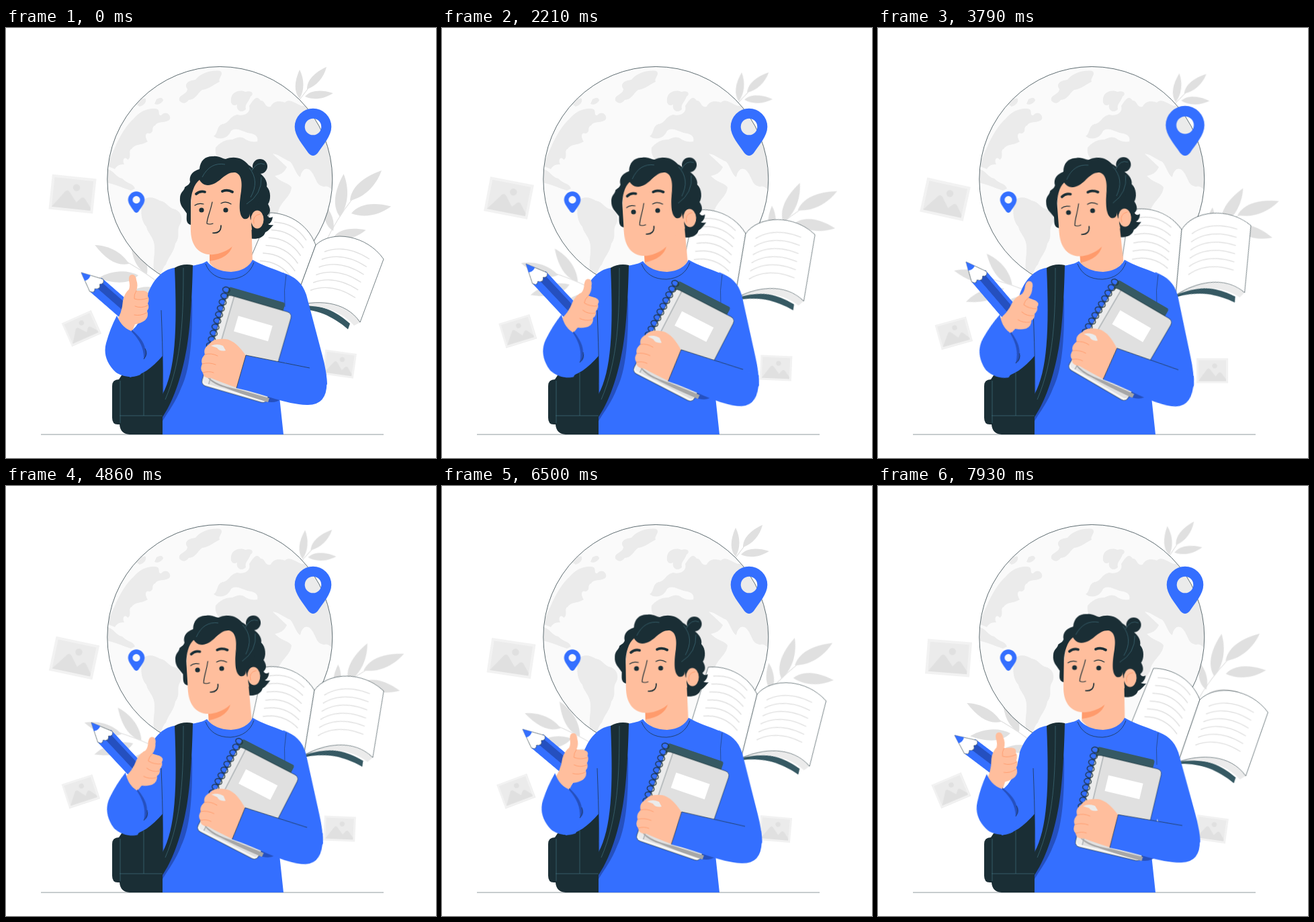
Write an HTML page without scripts that moves like this. It is 640 px wide and 640 px high and loops after 8 s.

```html
<!DOCTYPE html>
<html lang="en">
<head>
<meta charset="utf-8">
<title>Student with globe</title>
<style>
html, body { margin: 0; width: 100%; height: 100%; overflow: hidden; background: #fff; }
svg { display: block; width: 100%; height: 100%; }
.blue { fill: #346fff; }
.navy { fill: #2550bf; }
.dark { fill: #1a2e35; }
.teal { fill: #365963; }
.skin { fill: #ffbe9d; }
.land { fill: #ebebeb; }
.leaf { fill: #e0e0e0; }
.ink { fill: none; stroke: #1a2e35; stroke-width: .7; }
.page { fill: #fff; stroke: #1a2e35; stroke-width: .6; }
.seam { fill: none; stroke: #3f6f7c; stroke-width: .7; }
.fold { fill: none; stroke: #ff9b6c; stroke-width: .9; stroke-linecap: round; }
.rule { fill: none; stroke: #e0e0e0; stroke-width: 1.4; }
.stem { fill: none; stroke: #e0e0e0; stroke-width: 1.2; }

/* body: one long sine swing, --r is the widest angle */
.sway { animation: sway 8s infinite; }
@keyframes sway {
  0% { transform: rotate(0deg); animation-timing-function: cubic-bezier(.33,.37,.67,1); }
  44.2% { transform: rotate(var(--r)); animation-timing-function: cubic-bezier(.33,0,.67,.84); }
  100% { transform: rotate(calc(var(--r) * -.21)); }
}
.head { --r: -4.4deg; transform-origin: 335px 371px; }
.hand { --r: 21deg; transform-origin: 180px 478px; }
.sleeve { --r: 14deg; transform-origin: 180px 495px; }
.note { --r: 14.2deg; transform-origin: 387px 484px; }
.cuff { --r: 8.2deg; transform-origin: 430px 473px; }
.upper { --r: 3deg; transform-origin: 425px 380px; }

/* scenery: floats through six poses */
.drift { animation: drift 8s linear infinite; }
@keyframes drift {
  0% { transform: translate(0px,0px) rotate(0deg); }
  15.1% { transform: var(--a); }
  27.6% { transform: var(--b); animation-timing-function: cubic-bezier(.33,.45,.67,.9); }
  47.4% { transform: var(--c); animation-timing-function: cubic-bezier(.33,.1,.67,.55); }
  60.75% { transform: var(--d); }
  81.25% { transform: var(--e); }
  99.1%, 100% { transform: var(--f); }
}
.sprig { transform-origin: 400px 155px;
  --a: rotate(3.2deg); --b: rotate(5.7deg); --c: rotate(7.3deg);
  --d: rotate(5.1deg); --e: rotate(0deg); --f: rotate(-3.9deg); }
.branch { transform-origin: 475px 320px;
  --a: rotate(9.8deg); --b: rotate(17.8deg); --c: rotate(25deg);
  --d: rotate(21.2deg); --e: rotate(13deg); --f: rotate(5deg); }
.fern { transform-origin: 266px 413px;
  --a: rotate(-6.4deg); --b: rotate(-10.9deg); --c: rotate(-15.2deg);
  --d: rotate(-11.8deg); --e: rotate(-6.3deg); --f: rotate(0deg); }
.book { transform-origin: 461px 323px;
  --a: translate(-4px,-10px) rotate(-7.2deg); --b: translate(-9px,-17px) rotate(-10.8deg);
  --c: translate(-9px,-23px) rotate(-15.1deg); --d: translate(-2px,-19px) rotate(-11.1deg);
  --e: translate(8px,-13px) rotate(-6.2deg); --f: translate(18px,-5px) rotate(-1.2deg); }
.pencil { transform-origin: 112px 364px;
  --a: translate(7px,-7px) rotate(3deg); --b: translate(13px,-13px) rotate(6deg);
  --c: translate(19px,-16px) rotate(8.5deg); --d: translate(15px,-12px) rotate(6deg);
  --e: translate(8px,-2px) rotate(-1deg); --f: translate(2px,7px) rotate(-4deg); }
.pic1 { transform-origin: 99px 247px;
  --a: translate(0px,3px) rotate(2.5deg); --b: translate(.5px,6px) rotate(5deg);
  --c: translate(1px,8px) rotate(6.3deg); --d: translate(2.5px,9px) rotate(6deg);
  --e: translate(4px,9.5px) rotate(2.5deg); --f: translate(6px,9px) rotate(-1.5deg); }
.pic2 { transform-origin: 112px 447px;
  --a: translate(.5px,1px) rotate(4deg); --b: translate(.5px,4px) rotate(7deg);
  --c: translate(.5px,7px) rotate(8.5deg); --d: translate(-1px,7.5px) rotate(6deg);
  --e: translate(-2px,7px) rotate(3.5deg); --f: translate(-3.5px,6px) rotate(1deg); }
.pic3 { transform-origin: 496px 500px;
  --a: translate(0px,3px) rotate(-3deg); --b: translate(1px,6px) rotate(-5.5deg);
  --c: translate(1.5px,10px) rotate(-8deg); --d: translate(.5px,10px) rotate(-5.5deg);
  --e: translate(0px,10.5px) rotate(-3deg); --f: translate(0px,10.5px) rotate(0deg); }

.pulse { transform-origin: 457px 190px; animation: pulse 8s ease-in-out infinite; }
@keyframes pulse {
  0%, 43%, 55%, 100% { transform: scale(1); }
  49% { transform: scale(1.065); }
}
</style>
</head>
<body>
<svg viewBox="0 0 640 640">
<defs>
  <path id="leaf" class="leaf" d="M0 0C22 -20 58 -19 100 0C66 17 28 17 0 0Z"/>
  <g id="pic">
    <rect x="-33" y="-26" width="66" height="52" fill="#f2f2f2"/>
    <rect x="-29" y="-22" width="58" height="44" fill="#ebebeb"/>
    <path class="leaf" d="M-29 22L-11 -3Q-8 -6 -5 -3L7 12L13 5Q16 2 19 5L29 18V22Z"/>
    <circle class="leaf" cx="5" cy="-10" r="5.2"/>
  </g>
  <path id="pin" class="blue" fill-rule="evenodd" d="M-7 -4C-15 -16 -27.3 -29 -27.3 -43A27.3 27.3 0 0 1 27.3 -43C27.3 -29 15 -16 7 -4Q0 4 -7 -4ZM-12.3 -43a12.3 12.3 0 1 0 24.6 0a12.3 12.3 0 1 0 -24.6 0Z"/>
  <path id="rr" class="rule" d="M474 333Q506 321 541 344"/>
  <path id="rl" class="rule" d="M399 289Q430 290 447 316"/>
  <g id="row"><use href="#rr"/><use href="#rl"/></g>
  <pattern id="rings" x="-10" y="-11" width="16" height="9.6" patternUnits="userSpaceOnUse">
    <ellipse class="ink" cx="7" cy="4.8" rx="5.4" ry="4.2" style="stroke-width:1.2"/>
  </pattern>
  <clipPath id="ball"><circle cx="318.3" cy="225" r="167"/></clipPath>
</defs>

<g class="drift pic1"><use href="#pic" transform="translate(99 247) rotate(6)"/></g>
<g class="drift pic2"><use href="#pic" transform="translate(112 447) rotate(-24) scale(.72)"/></g>
<g class="drift pic3"><use href="#pic" transform="translate(496 500) rotate(8) scale(.71)"/></g>

<g class="drift sprig">
  <path class="stem" d="M424 124Q438 105 452 87"/>
  <use href="#leaf" transform="translate(448 91) rotate(-48.7) scale(.44)"/>
  <use href="#leaf" transform="translate(437 105) rotate(-90) scale(.43)"/>
  <use href="#leaf" transform="translate(445 102) rotate(-7) scale(.42)"/>
</g>
<g class="drift branch">
  <path class="stem" d="M475 320Q492 284 516 254"/>
  <use href="#leaf" transform="translate(512 257) rotate(-43.7) scale(.65)"/>
  <use href="#leaf" transform="translate(497 281) rotate(-85) scale(.64)"/>
  <use href="#leaf" transform="translate(514 276) rotate(-10) scale(.6)"/>
  <use href="#leaf" transform="translate(487 312) rotate(-13) scale(.5)"/>
  <use href="#leaf" transform="translate(487 302) rotate(-109) scale(.42)"/>
</g>
<g class="drift fern">
  <path class="stem" d="M266 413Q224 372 176 346"/>
  <use href="#leaf" transform="translate(183 351) rotate(209) scale(.58)"/>
  <use href="#leaf" transform="translate(210 366) rotate(246) scale(.6)"/>
  <use href="#leaf" transform="translate(197 368) rotate(176) scale(.6)"/>
  <use href="#leaf" transform="translate(232 391) rotate(180) scale(.45)"/>
</g>

<circle cx="318.3" cy="225" r="167.5" fill="#fafafa"/>
<g class="land" clip-path="url(#ball)">
  <path d="M258 108C256 99 269 100 270 91C264 83 272 78 282 77C290 66 307 62 319 64C325 69 315 75 318 80C306 86 302 91 292 92C284 98 282 107 272 107Q265 116 258 108Z"/>
  <path d="M150 205L162 178C170 160 178 146 190 135C199 124 210 119 222 120C232 121 224 130 231 130C238 121 248 131 243 137C235 142 226 138 222 145C215 148 222 154 214 157C206 154 207 164 211 169C202 175 192 172 187 180C181 182 188 193 181 196C177 190 172 196 176 203Q166 202 162 210Z"/>
  <path d="M193 113q7 -10 15 -8q2 8 -9 12zM224 106q9 -5 10 2q-6 8 -13 5z"/>
  <path d="M150 210C160 211 163 222 173 224C180 232 190 231 192 239L186 242C174 238 163 233 150 230Z"/>
  <path d="M203 258C210 249 221 252 229 257C240 259 241 268 252 270C263 275 263 287 258 294C254 302 260 310 252 321C250 334 242 340 238 352C232 357 233 367 225 369C215 360 222 341 221 326C221 312 211 306 209 296C199 284 201 270 203 258Z"/>
  <path d="M335 106C335 96 347 91 356 95C366 92 370 98 364 102C361 111 355 113 357 121C350 128 342 122 344 114C337 117 334 112 335 106Z"/>
  <path d="M309 161C316 157 313 146 322 143C332 142 333 131 344 129C354 132 365 126 362 116C368 107 373 99 379 108C386 107 385 120 394 117C399 107 410 109 415 111C421 104 430 112 440 116L500 110V250C485 242 480 233 474 236C460 235 463 222 452 211C446 207 440 211 438 222C431 218 430 207 423 199C413 195 406 188 397 187C404 194 413 202 418 207C414 216 407 219 400 220C409 230 420 230 425 237C424 252 407 259 405 275L390 300H340V205C325 205 309 193 312 178Q323 165 337 166Q348 160 354 164Q363 171 374 169C377 159 366 157 360 156C350 153 342 147 335 153C331 164 318 168 309 161Z"/>
</g>
<circle class="ink" cx="318.3" cy="225" r="167.5"/>

<path class="ink" d="M52 605H562" stroke-opacity=".7"/>

<g class="drift book">
  <path class="teal" d="M427 414C462 407 492 421 512 440L509 448.500C485 427 458 417 427 418Z"/>
  <path fill="#ebebeb" d="M427 415C465 404 505 408 527 438L518 443C497 418 460 410 427 415Z"/>
  <path class="page" d="M461 323C448 288 415 275 393 275L353 368C385 370 415 380 427 415Z"/>
  <path class="page" d="M461 323C485 300 537 308 562 344L527 438C505 405 460 404 427 415Z"/>
  <use href="#row"/>
  <use href="#row" x="-4.2" y="11.5"/>
  <use href="#row" x="-8.4" y="23"/>
  <use href="#row" x="-12.6" y="34.5"/>
  <use href="#row" x="-16.8" y="46"/>
  <use href="#row" x="-21" y="57.5"/>
</g>

<g class="pulse"><use href="#pin" transform="translate(457 190)"/></g>
<use href="#pin" transform="translate(194 275) scale(.45)"/>

<g class="sway head">
  <circle class="dark" cx="378" cy="206" r="11"/>
  <path class="dark" d="M352 205L372 213C384 218 390 229 388 236C395 243 394 257 390 262C395 271 393 276 389 279C391 284 395 282 397 281Q396 290 390 292Q393 294 398 293C392 300 389 303 386 304C383 314 370 315 361 313L345 260Z"/>
  <path class="skin" d="M303 320V350Q335 385 367 350L365 285Z"/>
  <path fill="#ff9b6c" d="M303 335Q322 336 337 324Q332 343 303 347Z"/>
  <path class="skin" d="M284 220C273 245 275 275 275 303C276 327 290 339 309 337C327 335 340 325 346 314L366 300L354 218Q320 202 284 220Z"/>
  <path class="dark" d="M275 293C267 291 269 283 269 276C264 268 258 264 259 253C259 244 266 242 266 237C270 234 273 233 274 229C272 217 281 212 288 210C289 196 298 190 309 191C317 190 322 195 327 195C339 190 353 193 361 204C374 211 384 232 375 262Q367 269 363 276Q362 286 354 284C346 279 347 262 350 243C352 229 350 217 341 215C326 214 320 229 306 233C296 236 291 231 288 226C280 232 275 247 275 262Z"/>
  <ellipse class="skin" cx="374" cy="285" rx="9.500" ry="13.5"/>
  <path class="fold" d="M369 291Q366 279 378 277"/>
  <path class="seam" d="M292 222Q304 199 326 203M380 222Q381 248 358 262M362 208Q378 228 364 252M366 212Q374 198 385 203"/>
  <g fill="none" stroke="#1a2e35" stroke-linecap="round">
    <path stroke-width="3.8" d="M283 247Q289 242 296 244M322 243Q330 240 337 244"/>
    <path stroke-width="1.2" d="M281 264Q286 260 294 262M320 261Q327 257 335 262"/>
    <path stroke-width="1.2" d="M307 259C304 274 299 283 299 291Q303 293 308 291"/>
    <path stroke-width="1.7" d="M308 305Q320 306 320 294"/>
  </g>
  <circle class="dark" cx="291" cy="271" r="3.6"/>
  <circle class="dark" cx="327" cy="271" r="3.6"/>
</g>

<path class="dark" d="M172 517L235 480V605H184Q170 604 169 590H166Q158 590 158 580V533Q158 523 168 523Z"/>
<path class="seam" d="M205 513V577M169 577H233M170 525V588"/>

<path class="blue" d="M250 357C276 354 290 353 299 347Q310 362 335 363Q359 361 367 345C380 353 398 358 414 365L430 430L406 540L413 605H233V488C217 506 203 517 184 520L184 452C197 446 207 422 211 396C219 374 233 360 250 357Z"/>
<path class="ink" d="M297 351Q306 374 334 374Q361 372 369 349M231 420Q235 520 233 580"/>
<path class="navy" d="M277 400C278 470 273 510 261 535C252 558 242 570 233 585V570L262 490Z"/>
<path class="dark" d="M251 357Q263 350 278 353C277 400 274 458 266 492C258 530 246 560 233 579V545C252 510 255 450 251 357Z"/>
<path class="seam" d="M264 357C264 430 262 495 237 553"/>

<g class="sway upper">
  <path class="blue" d="M412 364C430 370 441 379 447 397L471 488Q477 510 478 530L460 553L420 510L411 487Z"/>
</g>
<path class="ink" d="M417 367Q413 390 415 415" stroke-opacity=".7"/>

<g class="drift pencil"><g transform="translate(112 364) rotate(41)">
  <path class="blue" d="M28 -14H100V13H28Z"/>
  <path class="navy" d="M28 -9H100V2H28Z"/>
  <path class="page" d="M0 0L31 -14Q38 -10 32 -5Q39 0 31 5Q36 10 28 13Z"/>
  <path class="blue" d="M0 0L13 -6Q16 0 12 6Z"/>
</g></g>

<g class="sway hand">
  <path class="skin" d="M183 376Q182 367 188 367Q193 367 194 375Q197 383 194 391H205Q213 392 211 399Q214 404 211 410Q214 416 210 421Q213 429 207 435Q200 440 192 441L184 460L162 440Q173 425 174 406Q176 395 183 389Q185 383 183 376Z"/>
  <path class="fold" d="M194 391Q190 397 191 403Q200 406 211 402M192 414Q201 418 211 413M191 427Q200 429 209 424"/>
</g>
<g class="sway sleeve">
  <path class="blue" d="M165 428Q173 448 190 452Q207 470 209 491L200 516C190 521 173 520 163 512C149 499 145 483 149 469Q155 447 165 428Z"/>
  <path class="navy" d="M187 449Q205 464 207 477Q213 486 205 493Q206 471 187 452Z"/>
  <path class="ink" d="M207 477Q211 485 205 493"/>
</g>

<path class="navy sway cuff" d="M375 552Q398 562 410 552L402 540Z"/>
<g class="sway note"><g transform="translate(329 396.500) rotate(16.2)">
  <path class="teal" d="M0 -9Q0 -12 3 -12H84Q87 -12 87 -8V4H0Z"/>
  <rect class="ink" width="101" height="140" rx="7" style="fill:#f5f5f5"/>
  <path fill="#e0e0e0" d="M11 1H94Q100 1 100 7V130Q100 136 94 136H11Z"/>
  <path fill="#ebebeb" d="M1 7Q1 1 7 1H11V136H7Q1 136 1 130Z"/>
  <path class="ink" d="M11 0V136" stroke-opacity=".6"/>
  <rect x="25" y="26" width="53" height="24" fill="#fff"/>
  <rect x="-10" y="-11" width="16" height="96" fill="url(#rings)"/>
</g></g>

<g class="sway cuff">
  <path fill="#a6a6a6" d="M297 516Q312 532 346 538L392 551L390 557Q350 545 325 535Q304 529 297 516Z"/>
  <path class="skin" d="M358 489Q342 465 327 463Q308 461 302 471Q293 477 296 486Q289 493 292 500Q288 508 293 513Q294 522 305 521Q322 528 345 536Z"/>
  <path fill="#ebebeb" d="M305 473Q314 469 323 473L327 480Q318 482 314 476Z"/>
  <path class="fold" d="M296 486Q305 483 315 488M292 500Q302 497 312 501M293 513Q302 510 309 513"/>
  <path class="blue" d="M357 487L452 506L476 512Q484 562 448 561C415 560 385 545 343 536Z"/>
  <path class="ink" d="M452 506L357 487L343 536"/>
</g>
</svg>
</body>
</html>
```
